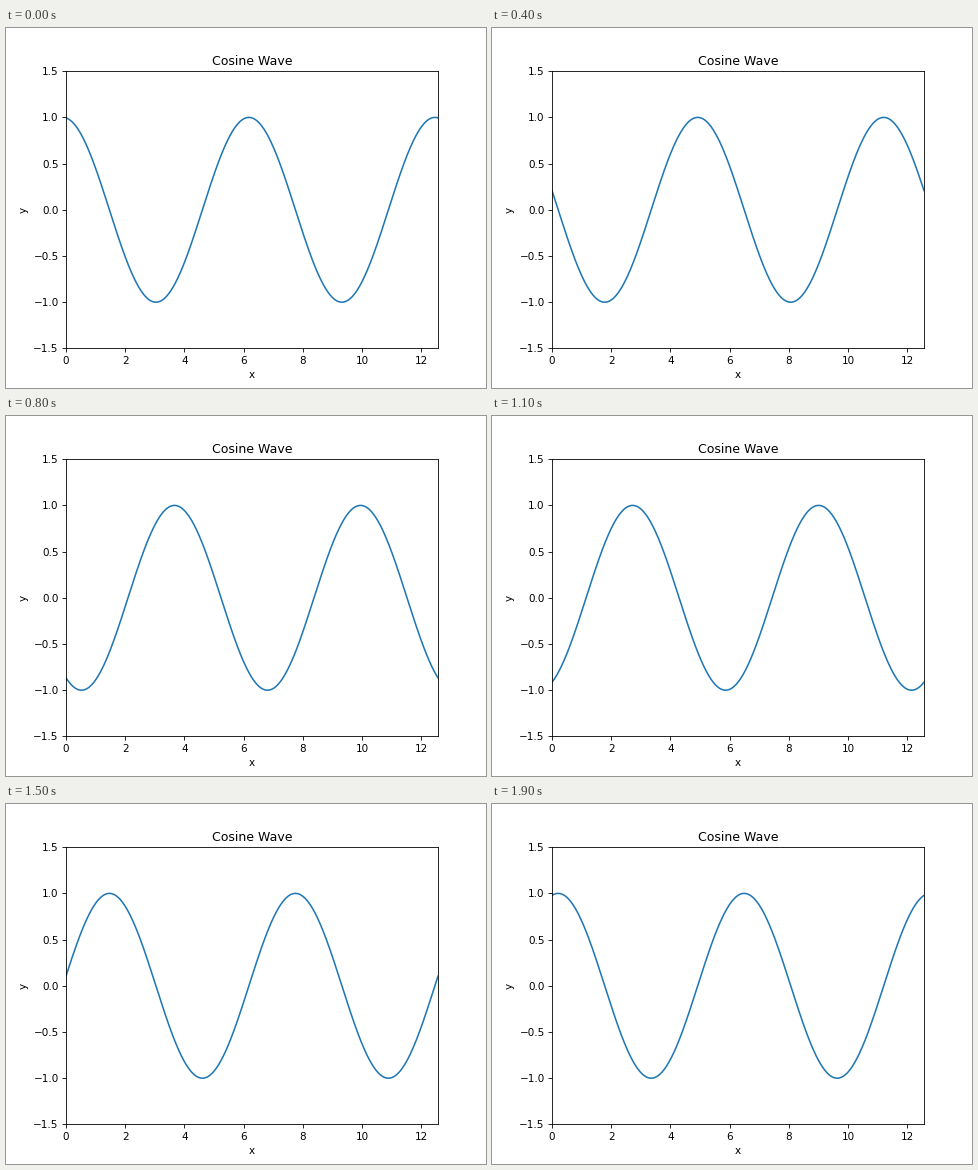
Animation, 480 px wide and 360 px high, one loop 2000 ms. Source, as a matplotlib script:

```python
import numpy as np
import matplotlib.pyplot as plt
from matplotlib.animation import FuncAnimation

FRAMES = 20
INTERVAL = 100  # ms
START_PHASE = 2 * np.pi / 60

fig, ax = plt.subplots(figsize=(6.4, 4.8), dpi=75)
ax.set_xlim(0, 4 * np.pi)
ax.set_ylim(-1.5, 1.5)
ax.set_title("Cosine Wave")
ax.set_xlabel("x")
ax.set_ylabel("y")

x = np.linspace(0, 4 * np.pi, 500)
wave, = ax.plot(x, np.cos(x + START_PHASE), color="#1f77b4", lw=1.5)


def update(frame):
    phase = START_PHASE + 2 * np.pi * frame / FRAMES
    wave.set_ydata(np.cos(x + phase))
    return wave,


def init():
    return update(0)


anim = FuncAnimation(fig, update, frames=FRAMES, init_func=init,
                     interval=INTERVAL, repeat=True, repeat_delay=0)

plt.show()
```
